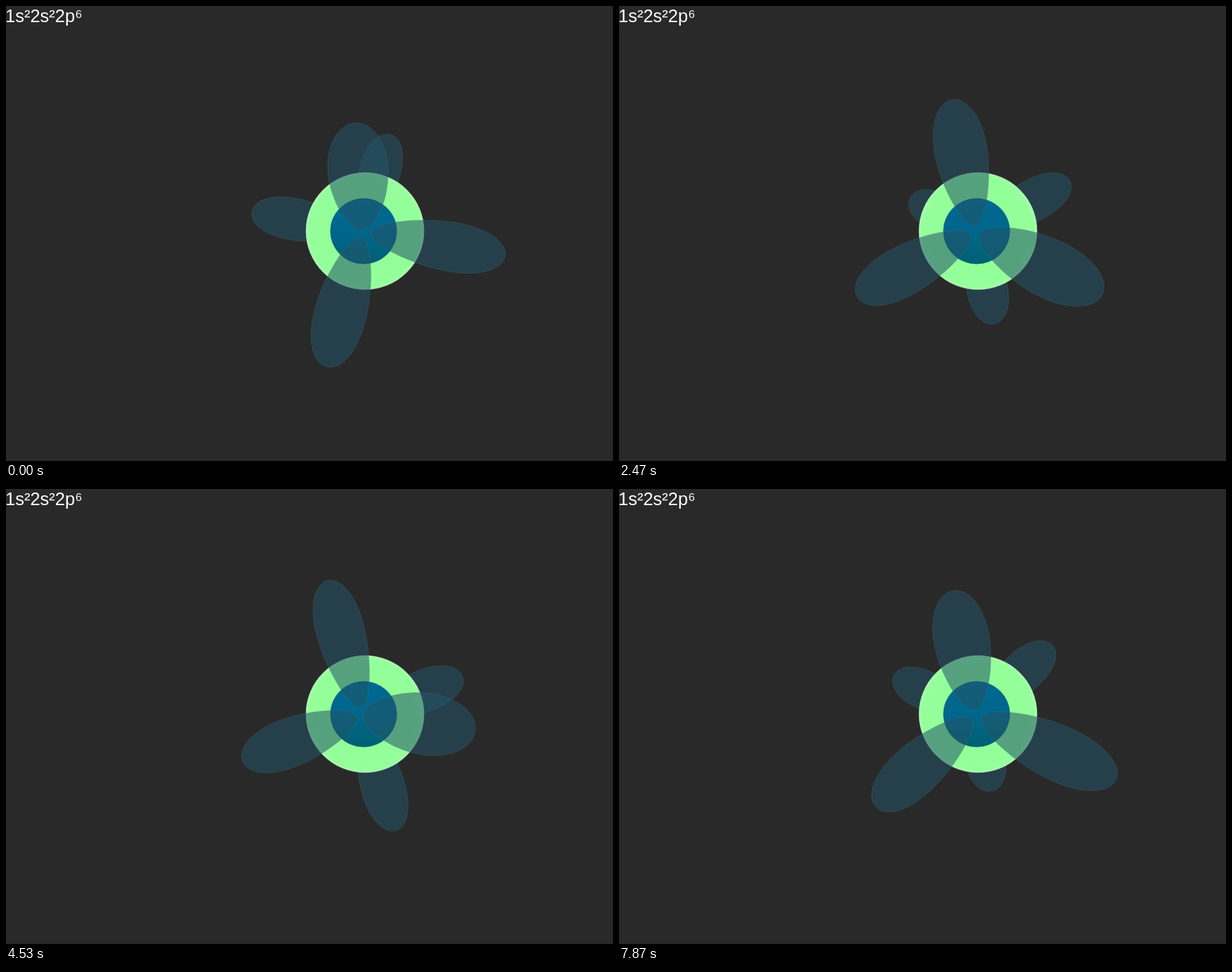
Animation of 864 by 648 pixels, one loop 8 s. Source, as an HTML page with a canvas:

```html
<!DOCTYPE html>
<html>
<head>
<meta charset="utf-8">
<style>
  html, body { margin: 0; width: 100%; height: 100%; overflow: hidden; background: #292929; }
  canvas { position: absolute; left: 0; top: 0; }
  div { position: absolute; left: -1px; top: 0; color: #fff; white-space: nowrap;
        font: 25.5px "Liberation Sans", Arial, sans-serif; }
</style>
</head>
<body>
<canvas id="stage" width="864" height="648"></canvas>
<div>1s²2s²2p⁶</div>
<script>
const ctx = document.getElementById('stage').getContext('2d');
const LOOP = 8000, FOCAL = 440, TILT = 0.012;
const CX = 508, CY = 321;        // nucleus on screen
const OFF_X = 76, OFF_Y = 3;     // nucleus relative to the optical axis, y up
const SPIN = [0.607, 0.6205, 0.4975];
const REACH = [186, 178, 186], INNER = 11, GIRTH = 31.1;
const REST = [[1, TILT, 0], [-TILT, 1, 0], [0, 0, 1]];

// The spin is almost steady; key angles in degrees by time
const KEYS = [[0, 205.5], [1730, 87.5], [3130, 0], [4530, -95],
              [5470, -150.8], [6670, -231], [LOOP, -311]];

function angleAt(t) {
  const i = Math.max(1, KEYS.findIndex(k => k[0] >= t));
  const [t0, a0] = KEYS[i - 1], [t1, a1] = KEYS[i];
  return (a0 + (a1 - a0) * (t - t0) / (t1 - t0)) * Math.PI / 180;
}

const dot = (a, b) => a[0] * b[0] + a[1] * b[1] + a[2] * b[2];
const cross = (a, b) => [a[1] * b[2] - a[2] * b[1], a[2] * b[0] - a[0] * b[2], a[0] * b[1] - a[1] * b[0]];

function spin(v, angle) {
  const c = Math.cos(angle), s = Math.sin(angle), w = cross(SPIN, v), k = dot(SPIN, v) * (1 - c);
  return v.map((x, i) => x * c + w[i] * s + SPIN[i] * k);
}

// Perspective, from nucleus-centred space to the screen
function project([x, y, z]) {
  const s = FOCAL / (FOCAL - z);
  return [CX - OFF_X + (OFF_X + x) * s, CY + OFF_Y - (OFF_Y + y) * s];
}

function hull(points) {
  points.sort((a, b) => a[0] - b[0] || a[1] - b[1]);
  const half = list => {
    const out = [];
    for (const p of list) {
      while (out.length > 1) {
        const [a, b] = out.slice(-2);
        if ((b[0] - a[0]) * (p[1] - a[1]) - (b[1] - a[1]) * (p[0] - a[0]) > 0) break;
        out.pop();
      }
      out.push(p);
    }
    return out.slice(0, -1);
  };
  return [...half(points), ...half(points.reverse())];
}

// Egg-shaped solid of revolution, drawn as its outline
function drawLobe({ axis, side, up, reach }) {
  const mid = (reach + INNER) / 2, len = (reach - INNER) / 2, points = [];
  for (let i = 0; i <= 28; i++) {
    const u = -Math.cos(Math.PI * i / 28);
    const r = GIRTH * Math.sqrt(Math.max(0, 1 - u * u)) * (1 + 0.25 * u);
    for (let j = 0; j < 40; j++) {
      const c = r * Math.cos(j * Math.PI / 20), s = r * Math.sin(j * Math.PI / 20);
      points.push(project(axis.map((a, k) => a * (mid + len * u) + side[k] * c + up[k] * s)));
    }
  }
  ctx.beginPath();
  for (const p of hull(points)) ctx.lineTo(...p);
  ctx.closePath();
  paint('rgba(35,84,102,.55)', 'rgba(70,125,140,.28)');
}

function ball(x, y, rx, ry, fill, rim) {
  ctx.beginPath();
  ctx.ellipse(x, y, rx, ry, 0, 0, 7);
  paint(fill, rim);
}

function paint(fill, rim) {
  ctx.fillStyle = fill;
  ctx.fill();
  ctx.strokeStyle = rim;
  ctx.stroke();
}

const green = ctx.createRadialGradient(511, 320.5, 60, 511, 320.5, 84);
green.addColorStop(0, '#93ff99');
green.addColorStop(0.8, '#95ff9b');
green.addColorStop(1, '#a6ffac');
const blue = ctx.createLinearGradient(0, 274, 0, 368);
blue.addColorStop(0, '#006892');
blue.addColorStop(0.5, '#00668c');
blue.addColorStop(1, '#006072');

function draw(t) {
  ctx.fillStyle = '#292929';
  ctx.fillRect(0, 0, 864, 648);
  ctx.fillStyle = '#2b262a';
  ctx.fillRect(0, 644, 864, 4);

  const axes = REST.map(v => spin(v, angleAt(t)));
  const lobes = axes.flatMap((v, i) => [1, -1].map(sign => {
    const axis = v.map(x => x * sign);
    return {
      axis, side: axes[(i + 1) % 3], up: axes[(i + 2) % 3], reach: REACH[i],
      near: axis[2] - 0.08 * axis[0] - 0.03   // the camera sits a little to the left
    };
  })).sort((a, b) => a.near - b.near);

  lobes.filter(l => l.near <= 0).forEach(drawLobe);
  ball(511, 320.5, 83.9, 83.2, green, 'rgba(215,255,220,.6)');
  ball(509, 320.7, 47.2, 46.6, blue, 'rgba(0,80,125,.5)');
  lobes.filter(l => l.near > 0).forEach(drawLobe);
}

function frame() {
  draw(performance.now() % LOOP);
  requestAnimationFrame(frame);
}
frame();
</script>
</body>
</html>
```
